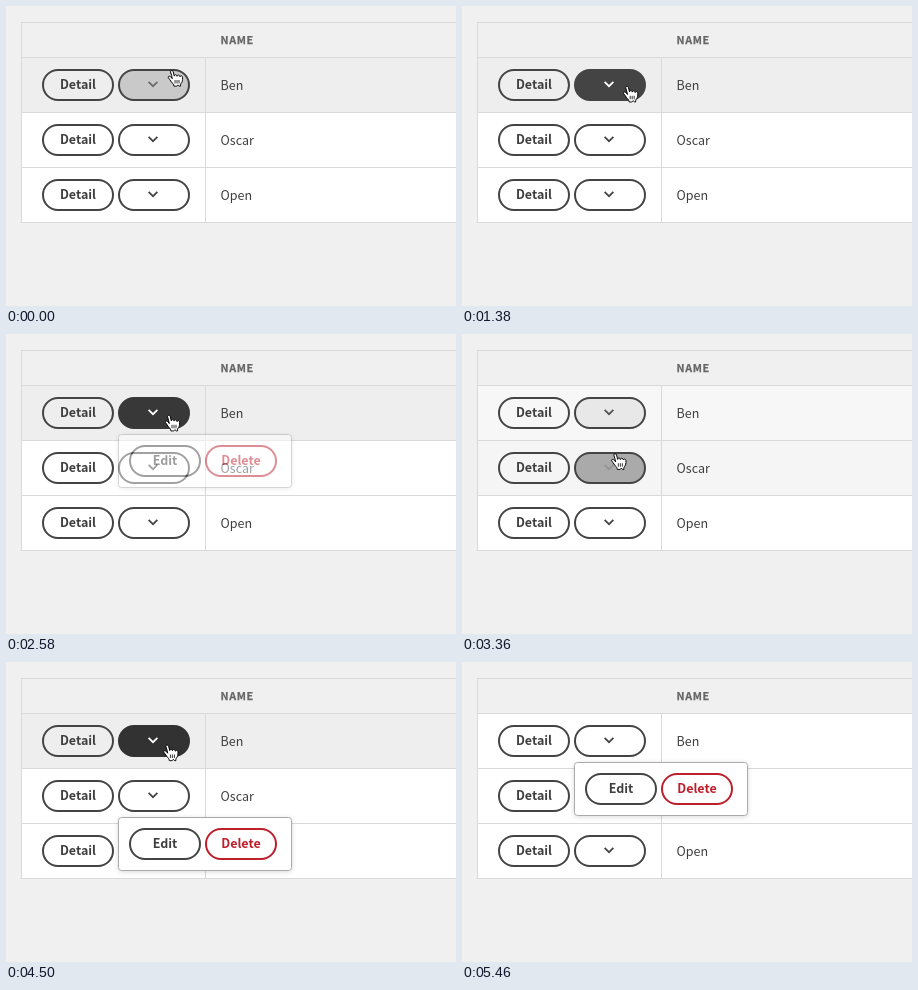
These frames come from a looping animation (450x300 px, 5700 ms). An HTML page:

```html
<!DOCTYPE html>
<html lang="en">
<head>
<meta charset="utf-8">
<title>Table row menu</title>
<style>
  html, body { margin: 0; width: 100%; height: 100%; overflow: hidden; background: #f0f0f0; }
  svg { display: block; width: 450px; height: 300px; }
  text { font-family: "Noto Sans CJK JP", "Noto Sans CJK SC", "Noto Sans CJK", "Open Sans", sans-serif; font-size: 12.5px; font-weight: 500; fill: #3e3e3e; }
  .head { font-size: 10.75px; font-weight: 700; letter-spacing: .6px; fill: #666; stroke: #666; stroke-width: .25px; }
  .label { font-weight: 700; text-anchor: middle; }
  .menu { filter: drop-shadow(.5px 1px 2.5px rgba(0, 0, 0, .15)); }
</style>
</head>
<body>
<svg id="stage" viewBox="0 0 450 300"></svg>
<script>
const LOOP = 5700, STEP = 60, LAST = 5460, ROW = 55;
const INK = '#444', RED = '#bd1f2b', LINE = '#d9d9d9';
const FADE = 200, MENU_FADE = 120, MENU_DELAY = 60;

// Each span is [enter, leave] or [open, close] in ms.
const rows = [
  { name: 'Ben', hover: [[-FADE, 3260], [4200, 5130]], over: [[-60, 1460], [1690, 3195], [4220, 5070]],
    open: [[360, 1020], [1860, 2460], [4440, LOOP]] },
  { name: 'Oscar', hover: [[3246, 4200]], over: [[3270, 4170]], open: [[3540, 4440]] },
  { name: 'Open', hover: [], over: [], open: [] }
];
const clicks = rows.flatMap(row => row.open.flat()).filter(t => t < LOOP);

const home = { x: 166, y: 64.5 };
const moves = [
  { from: 0, to: 360, x: 156.5, y: 73 },
  { from: 800, to: 1020, x: 163, y: 80 },
  { from: 1350, to: 1590, x: 214, y: 87 },
  { from: 1590, to: 1830, x: 163, y: 81.3 },
  { from: 3160, to: 3370, x: 153.3, y: 120 },
  { from: 4110, to: 4380, x: 161.4, y: 83 },
  { from: 4980, to: LAST, x: 188, y: 330 }
];

const clamp = v => Math.max(0, Math.min(1, v));
const smooth = v => { const k = clamp(v); return k * k * (3 - 2 * k); };
const mix = (a, b, k) => a + (b - a) * k;
const gray = v => { const n = Math.round(v); return `rgb(${n},${n},${n})`; };

const fade = (spans, t, ms) =>
  spans.reduce((sum, [a, b]) => sum + smooth((t - a) / ms) - smooth((t - b) / ms), 0);

const pointerAt = t => moves.reduce((p, m) => {
  const k = smooth((t - m.from) / (m.to - m.from));
  return { x: mix(p.x, m.x, k), y: mix(p.y, m.y, k) };
}, home);

const pressAt = t => Math.max(...clicks.map(c => Math.min(clamp((t - c) / 60), clamp((c + 240 - t) / 180))));

function set(node, attrs) {
  for (const key in attrs) node.setAttribute(key, attrs[key]);
}
function add(parent, tag, attrs = {}, text) {
  const node = document.createElementNS('http://www.w3.org/2000/svg', tag);
  set(node, attrs);
  if (text) node.textContent = text;
  parent.appendChild(node);
  return node;
}
function pill(parent, x, y, label, color = INK) {
  const shape = add(parent, 'rect', {
    x: x + 1, y: y + 1, width: 70, height: 30, rx: 15, fill: INK, 'fill-opacity': 0, stroke: color, 'stroke-width': 2
  });
  if (label) {
    const caption = add(parent, 'text', { x: x + 36, y: y + 20, class: 'label' }, label);
    if (color !== INK) caption.style.fill = color;
  }
  return shape;
}

const stage = document.getElementById('stage');
add(stage, 'rect', { width: 450, height: 300, fill: '#f0f0f0' });

rows.forEach((row, i) => {
  const g = add(stage, 'g', { transform: `translate(0 ${i * ROW})` });
  row.back = add(g, 'rect', { x: 16, y: 52, width: 434, height: 54 });
  add(g, 'path', { d: 'M15 106.5H450', stroke: LINE });
  pill(g, 36, 63, 'Detail');
  row.button = pill(g, 112, 63);
  row.arrow = add(g, 'path', { d: 'M142.6 75.8L147 80.2L151.4 75.8', fill: 'none', 'stroke-width': 1.7 });
  add(g, 'text', { x: 214.6, y: 84 }, row.name);
});
add(stage, 'path', { d: 'M15 16.5H450M15 51.5H450M15.5 16V217M199.5 52V217', stroke: LINE, fill: 'none' });
add(stage, 'text', { x: 214.6, y: 38, class: 'head' }, 'NAME');

rows.forEach((row, i) => {
  const place = add(stage, 'g', { transform: `translate(0 ${i * ROW})` });
  row.menu = add(place, 'g', { class: 'menu' });
  add(row.menu, 'rect', { x: 112.5, y: 100.5, width: 173, height: 53, rx: 3, fill: '#fff', stroke: '#aaa' });
  pill(row.menu, 123, 111, 'Edit');
  pill(row.menu, 199, 111, 'Delete', RED);
});

const ring = add(stage, 'g', { fill: 'none' });
add(ring, 'circle', { r: 29, stroke: '#fff', 'stroke-width': 4.6, 'stroke-opacity': .7 });
add(ring, 'circle', { r: 29, stroke: '#000', 'stroke-width': 3 });

const hand = add(stage, 'g', { stroke: '#000', 'stroke-linejoin': 'round' });
add(hand, 'path', {
  d: 'M-1.5 1.4C-1.5-.4 .6-.6 1.2 1.2L2.3 5.6C2.4 3.8 4.9 3.8 5 5.8C5.2 4 7.7 4.2 8 6.2' +
     'C8.4 4.8 10.6 5 10.6 7C10.6 10 10.4 11 9.6 12.2C8.6 13.4 8.4 13.8 8.5 15.6' +
     'C7 15.8 6.8 15.6 6 14.4C5 15.8 4.4 15.8 1.9 15.6C1.9 14 1 13.4-.6 11.4' +
     'C-1.6 9.6-2.9 8.4-3.6 7.3C-4.4 5.6-2.2 5.2-1 6.6L.3 8.2C0 6-.8 4-1.5 1.4Z',
  fill: '#fff'
});
add(hand, 'path', { d: 'M3 9.5V13M5 9.5V13M7 9.5V13', 'stroke-width': .8, fill: 'none' });

function render(t) {
  const press = pressAt(t);
  for (const row of rows) {
    const over = fade(row.over, t, FADE);
    const ink = gray(mix(68, 50, press * over));
    set(row.back, { fill: gray(mix(255, 238, fade(row.hover, t, FADE))) });
    set(row.button, { fill: ink, stroke: ink, 'fill-opacity': over });
    set(row.arrow, { stroke: gray(mix(68, 255, over)) });
    set(row.menu, { opacity: fade(row.open, t - MENU_DELAY, MENU_FADE) });
  }
  const { x, y } = pointerAt(t);
  const clicking = clicks.some(c => t >= c && t < c + STEP);
  set(hand, { transform: `translate(${x} ${y})` });
  set(ring, { transform: `translate(${x + .5} ${y - .4})`, visibility: clicking ? 'visible' : 'hidden' });
}

const start = performance.now();
function tick() {
  const t = (performance.now() - start) % LOOP;
  render(Math.min(LAST, Math.floor(t / STEP) * STEP));
  requestAnimationFrame(tick);
}
tick();
</script>
</body>
</html>
```
